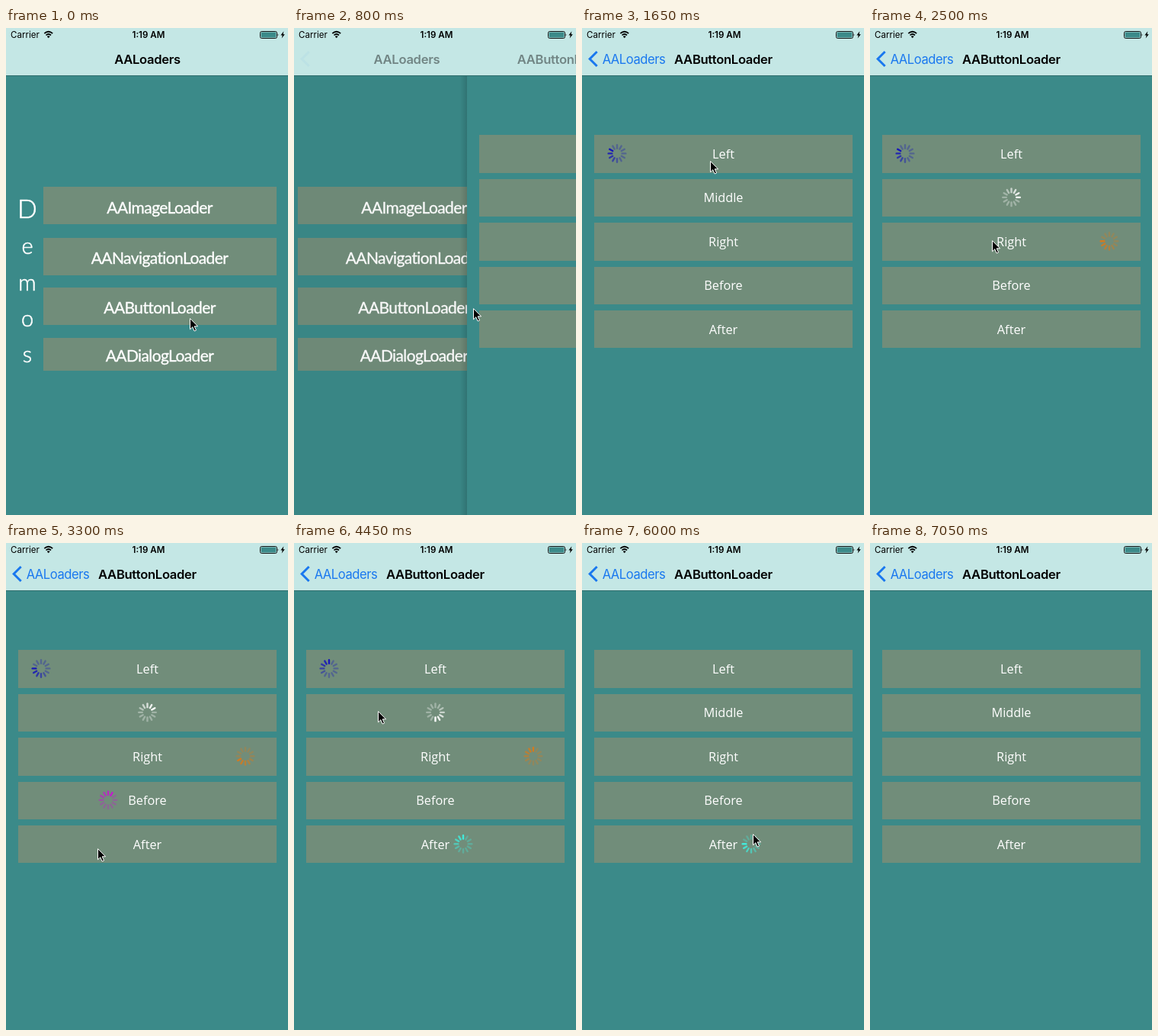
Animation, 370 px wide and 638 px high, one loop 7.1 s. Source, as an HTML page:

```html
<!DOCTYPE html>
<html lang="en">
<head>
<meta charset="utf-8">
<title>Button loaders</title>
<style>
  html, body { margin: 0; width: 100%; height: 100%; overflow: hidden; background: #3b8a89; }
  svg { display: block; width: 370px; height: 638px; }
  text { text-anchor: middle; }
  .ui { font-family: Inter, "Liberation Sans", sans-serif; }
  .status { font-size: 11.6px; }
  .nav { font-size: 16.6px; letter-spacing: -.45px; }
  .bold { font-weight: 600; }
  .nav .bold { letter-spacing: -.31px; }
  .hand { font-family: Lato, "Open Sans", sans-serif; fill: #fff; stroke: #fff; stroke-linejoin: round; }
  .menu { font-size: 21px; letter-spacing: -.6px; stroke-width: .35; }
  .thin { font-size: 29px; font-weight: 300; stroke-width: .6; }
  .option { font: 16.3px "Open Sans", "Noto Sans", sans-serif; fill: #fff; }
</style>
</head>
<body>
<svg viewBox="0 0 370 638">
  <defs>
    <linearGradient id="edge">
      <stop offset="0" stop-color="#000" stop-opacity="0"/>
      <stop offset="1" stop-color="#000" stop-opacity=".14"/>
    </linearGradient>
  </defs>
  <rect width="370" height="638" fill="#3b8a89"/>
  <g id="home"></g>
  <rect id="dim" width="370" height="638"/>
  <g id="detail">
    <rect x="-9" width="9" height="638" fill="url(#edge)"/>
    <rect width="370" height="638" fill="#3b8a89"/>
  </g>
  <rect width="370" height="62" fill="#c4e7e5"/>
  <rect y="62" width="370" height="1" fill="#2f6d6c"/>
  <g class="ui">
    <g class="status">
      <text x="25" y="13">Carrier</text>
      <text x="187" y="13" class="bold">1:19 AM</text>
    </g>
    <g fill="none" stroke="#000" stroke-width="1.7">
      <path d="M50.3 7.2Q55.7 2.3 61.2 7.2"/>
      <path d="M52.5 9.5Q55.7 6.5 59 9.5"/>
    </g>
    <path d="M53.8 11Q55.7 9.4 57.7 11L55.7 13.2Z"/>
    <rect x="333.5" y="4.5" width="22" height="9" rx="2" fill="none" stroke="#000" stroke-width=".9"/>
    <rect x="334.6" y="5.6" width="19.8" height="6.8" rx=".7" fill="#3b8a89"/>
    <path d="M356.7 7.3q1.5 1.7 0 3.4z"/>
    <path d="M364.4 4.3l-4 5.3h2.3l-1 4 4.1-5.4h-2.3z"/>
    <g class="nav">
      <text id="oldTitle" y="46.5" class="bold">AALoaders</text>
      <text id="newTitle" y="46.5" class="bold">AAButtonLoader</text>
      <text id="back" y="46.5" fill="#1a78ef">AALoaders</text>
    </g>
    <path id="chevron" d="M19.7 31L10.2 40.5L19.7 50" fill="none" stroke="#1a78ef" stroke-width="3"/>
  </g>
  <g id="pointer">
    <path d="M.5 .6V14.8L3.8 11.7L6.1 17L8.5 16L6.2 10.8H10.6Z" fill="#000" stroke="#fff"/>
  </g>
</svg>
<script>
const LOOP = 7100, STEP = 50;
const PUSH_START = 751, PUSH_TIME = 525;
const HOURS_PER_MS = 13.5 / 1000;
const BUTTON = '#718d7a';
const $ = id => document.getElementById(id);

function add(parent, tag, attrs, label) {
  const node = document.createElementNS('http://www.w3.org/2000/svg', tag);
  for (const key in attrs) node.setAttribute(key, attrs[key]);
  if (label) node.textContent = label;
  return parent.appendChild(node);
}

// Home page: label, top, height, baseline
[['AAImageLoader', 208, 49, 243], ['AANavigationLoader', 275, 49, 309],
 ['AAButtonLoader', 340, 49, 374], ['AADialogLoader', 406, 43, 437]]
.forEach(([label, y, height, base]) => {
  add($('home'), 'rect', { x: 49, y, width: 306, height, fill: BUTTON });
  add($('home'), 'text', { x: 201.5, y: base, class: 'hand menu' }, label);
});
[...'Demos'].forEach((letter, i) => {
  const text = add($('home'), 'text', { x: 28, y: 249 + i * 47.3, class: 'hand thin' }, letter);
  if (!i) text.style.fontSize = '34px';
});

// Detail page: spinner position, colour, running interval, leading petal at t = 3300
const options = [
  { label: 'Left', x: 46, color: '#1717b8', on: 1600, off: 4850, head: 8.7 },
  { label: 'Middle', x: 185.5, color: '#fff', on: 2100, off: 4500, head: 2.2, swap: true },
  { label: 'Right', x: 314, color: '#d27b20', on: 2500, off: 5550, head: 8.2 },
  { label: 'Before', x: 134, color: '#c21ccb', on: 2900, off: 3950, head: 1.2 },
  { label: 'After', x: 222, color: '#42eadb', on: 3400, off: 6200, head: 8.2 }
];
options.forEach((opt, i) => {
  const top = 140.4 + i * 57.45, y = Math.round(top);
  const height = Math.round(top + 49.25) - y;
  add($('detail'), 'rect', { x: 16, y, width: 339, height, fill: BUTTON });
  opt.text = add($('detail'), 'text', { x: 185.5, y: top + 30.6, class: 'option' }, opt.label);
  opt.spinner = add($('detail'), 'g', {
    transform: `translate(${opt.x} ${top + 24})`,
    stroke: opt.color, 'stroke-width': 2.4, 'stroke-linecap': 'round'
  });
  opt.petals = Array.from({ length: 12 }, (_, k) =>
    add(opt.spinner, 'path', { d: 'M0-6.7V-11.3', transform: `rotate(${k * 30})` }));
});

// Pointer stops: time, x, y
const route = [
  [0, 241, 380], [500, 241, 380], [800, 235, 367], [1000, 222, 315], [1450, 168, 174],
  [1700, 168, 174], [2000, 165, 222], [2150, 165, 222], [2400, 160, 278], [2550, 160, 278],
  [2800, 146, 338], [2950, 146, 338], [3250, 120, 400], [3450, 120, 402], [3850, 114, 340],
  [4050, 114, 340], [4400, 110, 220], [4550, 110, 220], [4750, 110, 165], [4900, 112, 165],
  [5200, 322, 160], [5450, 312, 275], [5650, 312, 275], [6050, 220, 386], [6250, 220, 386],
  [6650, 205, 600], [6750, 203, 650], [LOOP, 203, 650]
];

function pointerAt(t) {
  const i = route.findIndex((stop, k) => k && t <= stop[0]);
  const [t0, x0, y0] = route[i - 1], [t1, x1, y1] = route[i];
  const u = (t - t0) / (t1 - t0), s = u * u * (3 - 2 * u);
  return [x0 + (x1 - x0) * s, y0 + (y1 - y0) * s];
}

function pushAt(t) {
  const u = Math.min(1, Math.max(0, (t - PUSH_START) / PUSH_TIME));
  return (1 - Math.exp(-5.2 * u)) / (1 - Math.exp(-5.2));
}

const fade = (node, value) => node.setAttribute('opacity', Math.min(1, Math.max(0, value)));
const move = (node, x, y = 0) =>
  node.setAttribute('transform', `translate(${Math.round(x)} ${Math.round(y)})`);

function drawSpinner(opt, t) {
  const running = t >= opt.on && t < opt.off;
  fade(opt.spinner, running ? 1 : 0);
  if (opt.swap) fade(opt.text, running ? 0 : 1);
  const head = Math.round(opt.head + (t - 3300) * HOURS_PER_MS);
  opt.petals.forEach((petal, k) => {
    const age = (((head - k) % 12) + 12) % 12;
    fade(petal, Math.max(.33, 1 - age * .13));
  });
}

function render(t) {
  const p = pushAt(t);
  move($('home'), -113 * p);
  fade($('dim'), .07 * p);
  move($('detail'), 370 * (1 - p) + (p ? 0 : 20));

  const titleX = 185.5 - 117.5 * p ** 1.2;
  $('oldTitle').setAttribute('x', titleX);
  $('back').setAttribute('x', titleX);
  $('newTitle').setAttribute('x', 185.5 + 280 * (1 - p));
  fade($('oldTitle'), 1 - 1.5 * p);
  fade($('newTitle'), 1.08 * p);
  fade($('back'), (p - .4) / .6);
  fade($('chevron'), (p - .36) / .64);

  options.forEach(opt => drawSpinner(opt, t));
  move($('pointer'), ...pointerAt(t));
}

const start = performance.now();
function tick() {
  const t = (performance.now() - start) % LOOP;
  render(Math.floor(t / STEP) * STEP);
  requestAnimationFrame(tick);
}
tick();
</script>
</body>
</html>
```
